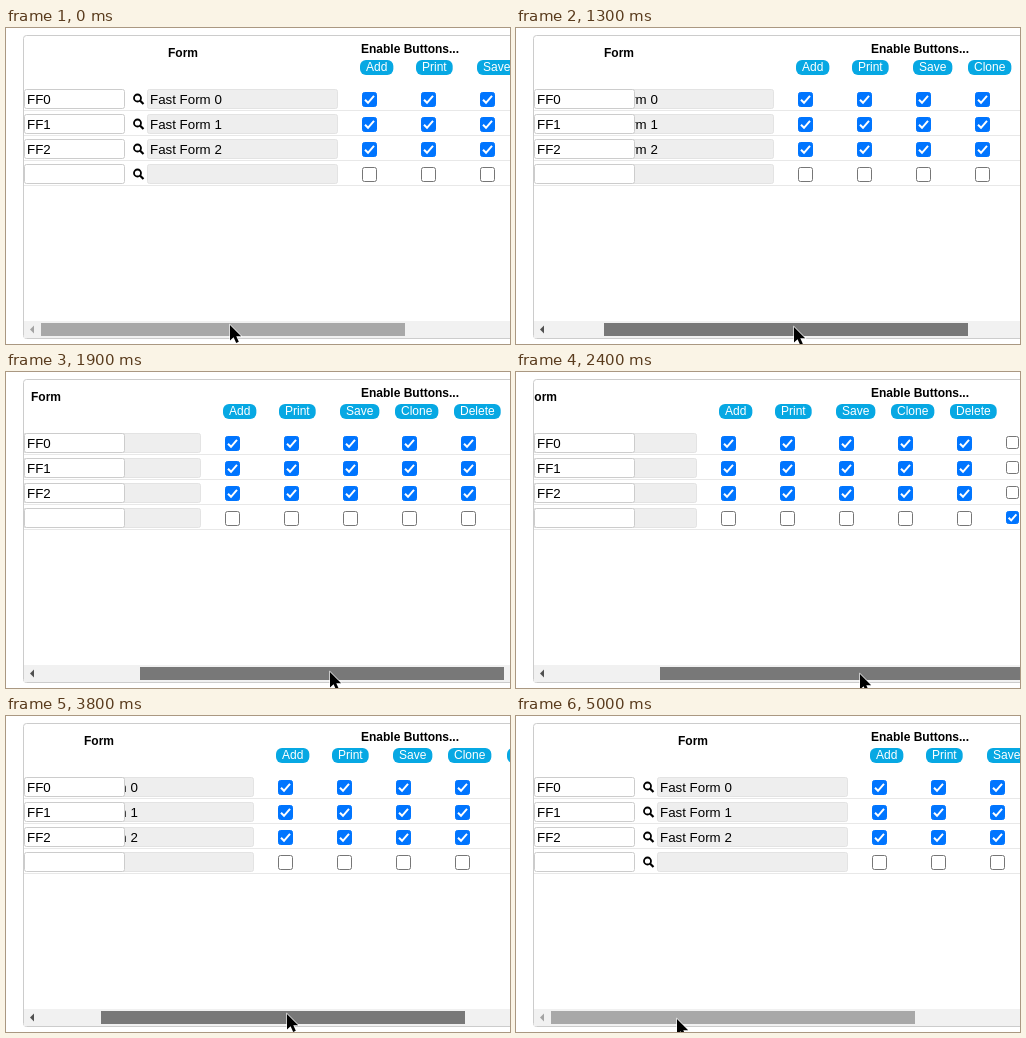
Write an HTML page with a canvas that moves like this. It is 504x316 px and loops after 7.6 s.

```html
<!DOCTYPE html>
<html lang="en">
<head>
<meta charset="utf-8">
<title>Scrolling grid with a fixed column</title>
<style>
  html, body { margin: 0; width: 100%; height: 100%; overflow: hidden; background: #fff; }
  canvas { display: block; }
</style>
</head>
<body>
<canvas id="stage" width="504" height="316"></canvas>
<script>
const ctx = document.getElementById('stage').getContext('2d');
const FAMILY = '"Liberation Sans", Arial, sans-serif';
const LOOP = 7600, STEP = 100;
const PRESS = 100, RELEASE = 5000;
const THUMB_MIN = 35, THUMB_MAX = 144, THUMB_WIDTH = 364;
const GRAB = 189;    // pointer distance from the thumb's left edge
const LAG = 20;      // ms the thumb trails behind the pointer
const RATIO = 0.72;  // thumb travel per scrolled pixel

// Pointer path: time, x, y, horizontal speed (px/ms)
const path = [
  [0, 224, 297, 0], [900, 246.6, 298, 0.055], [1600, 303.8, 299, 0.066], [2400, 344, 302, 0],
  [3100, 344, 302, 0], [3800, 281.9, 298, -0.115], [4200, 230.4, 295, -0.11], [5000, 161, 303, 0]
];
const buttons = [['Add', 354], ['Print', 410], ['Save', 471], ['Clone', 526], ['Delete', 585]];
const rows = [0, 1, 2, 3].map(i => ({
  top: 61 + 25 * i,
  code: i < 3 ? 'FF' + i : '',
  name: i < 3 ? 'Fast Form ' + i : '',
  enabled: i < 3
}));

const clamp = (v, lo, hi) => Math.min(hi, Math.max(lo, v));

function hermite(a, b, va, vb, u, span) {
  const u2 = u * u, u3 = u2 * u;
  return a * (2 * u3 - 3 * u2 + 1) + b * (3 * u2 - 2 * u3)
    + span * (va * (u3 - 2 * u2 + u) + vb * (u3 - u2));
}

function pointerAt(time) {
  const t = clamp(time, 0, path[path.length - 1][0]);
  const next = Math.max(1, path.findIndex(k => k[0] >= t));
  const a = path[next - 1], b = path[next];
  const span = b[0] - a[0], u = (t - a[0]) / span;
  return { x: hermite(a[1], b[1], a[3], b[3], u, span), y: hermite(a[2], b[2], 0, 0, u, span) };
}

function rect(x, y, w, h, fill) {
  ctx.fillStyle = fill;
  ctx.fillRect(x, y, w, h);
}

function box(x, y, w, h, radius, fill, border) {
  ctx.beginPath();
  ctx.roundRect(x + 0.5, y + 0.5, w - 1, h - 1, radius);
  ctx.fillStyle = fill;
  ctx.fill();
  ctx.strokeStyle = border;
  ctx.lineWidth = 1;
  ctx.stroke();
}

function text(str, x, y, font, color = '#000') {
  ctx.font = font + ' ' + FAMILY;
  ctx.fillStyle = color;
  ctx.fillText(str, x, y);
}

function line(points, width, color) {
  ctx.beginPath();
  points.forEach(([x, y]) => ctx.lineTo(x, y));
  ctx.lineWidth = width;
  ctx.strokeStyle = color;
  ctx.stroke();
}

function checkbox(x, y, size, checked) {
  if (!checked) return box(x, y, size, size, 2, '#fff', '#767676');
  box(x, y, size, size, 2, '#0075ff', '#0075ff');
  const k = size / 15;
  line([[x + 3 * k, y + 7.8 * k], [x + 6 * k, y + 10.8 * k], [x + 12 * k, y + 3.8 * k]], 2, '#fff');
}

function magnifier(x, y) {
  ctx.beginPath();
  ctx.arc(x, y, 3.5, 0, 2 * Math.PI);
  ctx.lineWidth = 1.8;
  ctx.strokeStyle = '#000';
  ctx.stroke();
  line([[x + 2.5, y + 2.5], [x + 6, y + 6]], 2.2, '#000');
}

function drawScrolled() {
  text('Form', 162, 29, 'bold 12px');
  for (const [label, x] of buttons) {
    ctx.font = '12px ' + FAMILY;
    const width = ctx.measureText(label).width + 12;
    ctx.beginPath();
    ctx.roundRect(x, 32, width, 15, 6);
    ctx.fillStyle = '#07a8e3';
    ctx.fill();
    text(label, x + 6, 43, '12px', '#fff');
  }
  for (const row of rows) {
    magnifier(131.5, row.top + 9);
    box(141, row.top, 191, 20, 2, '#eee', '#e3e3e3');
    text(row.name, 144, row.top + 15, '13.333px');
    buttons.forEach((_, i) => checkbox(356 + 59 * i, row.top + 3, 15, row.enabled));
    checkbox(641, row.top + 3, 13, !row.enabled);
  }
}

function drawScrollbar(thumb, pressed, scrolled) {
  rect(18, 293, 486, 17, '#f1f1f1');
  ctx.beginPath();
  ctx.moveTo(28, 297.5);
  ctx.lineTo(24, 301.5);
  ctx.lineTo(28, 305.5);
  ctx.fillStyle = scrolled ? '#505050' : '#a3a3a3';
  ctx.fill();
  rect(Math.round(thumb), 295, THUMB_WIDTH, 13, pressed ? '#787878' : '#a8a8a8');
}

function drawPointer(x, y) {
  ctx.save();
  ctx.translate(x, y);
  ctx.beginPath();
  [[0, 0], [0, 15.5], [3.6, 12.2], [6.2, 18], [8.8, 16.8], [6.3, 11.2], [11.2, 11.2]]
    .forEach(([px, py]) => ctx.lineTo(px, py));
  ctx.closePath();
  ctx.lineWidth = 1.2;
  ctx.strokeStyle = '#fff';
  ctx.stroke();
  ctx.fillStyle = '#000';
  ctx.fill();
  ctx.restore();
}

function draw(time) {
  const t = Math.floor((time % LOOP) / STEP) * STEP;
  const pressed = t >= PRESS && t < RELEASE;
  const pointer = pointerAt(t);
  const thumb = pressed ? clamp(pointerAt(t - LAG).x - GRAB, THUMB_MIN, THUMB_MAX) : THUMB_MIN;
  const scroll = Math.round((thumb - THUMB_MIN) / RATIO);

  rect(0, 0, 504, 316, '#fff');
  box(17, 7, 520, 304, 3, '#fff', '#ccc');

  ctx.save();
  ctx.beginPath();
  ctx.rect(18, 8, 486, 302);
  ctx.clip();
  rows.forEach(row => rect(18, row.top + 21, 486, 1, '#e8e8e8'));
  ctx.save();
  ctx.translate(-scroll, 0);
  drawScrolled();
  ctx.restore();
  text('Enable Buttons...', 355, 25, 'bold 12px');
  for (const row of rows) {
    box(18, row.top, 101, 20, 2, '#fff', '#ccc');
    text(row.code, 21, row.top + 15, '13.333px');
  }
  drawScrollbar(thumb, pressed, scroll > 0);
  ctx.restore();

  drawPointer(Math.floor(pointer.x), Math.round(pointer.y));
}

const start = performance.now();
function tick() {
  draw(performance.now() - start);
  requestAnimationFrame(tick);
}
tick();
</script>
</body>
</html>
```
